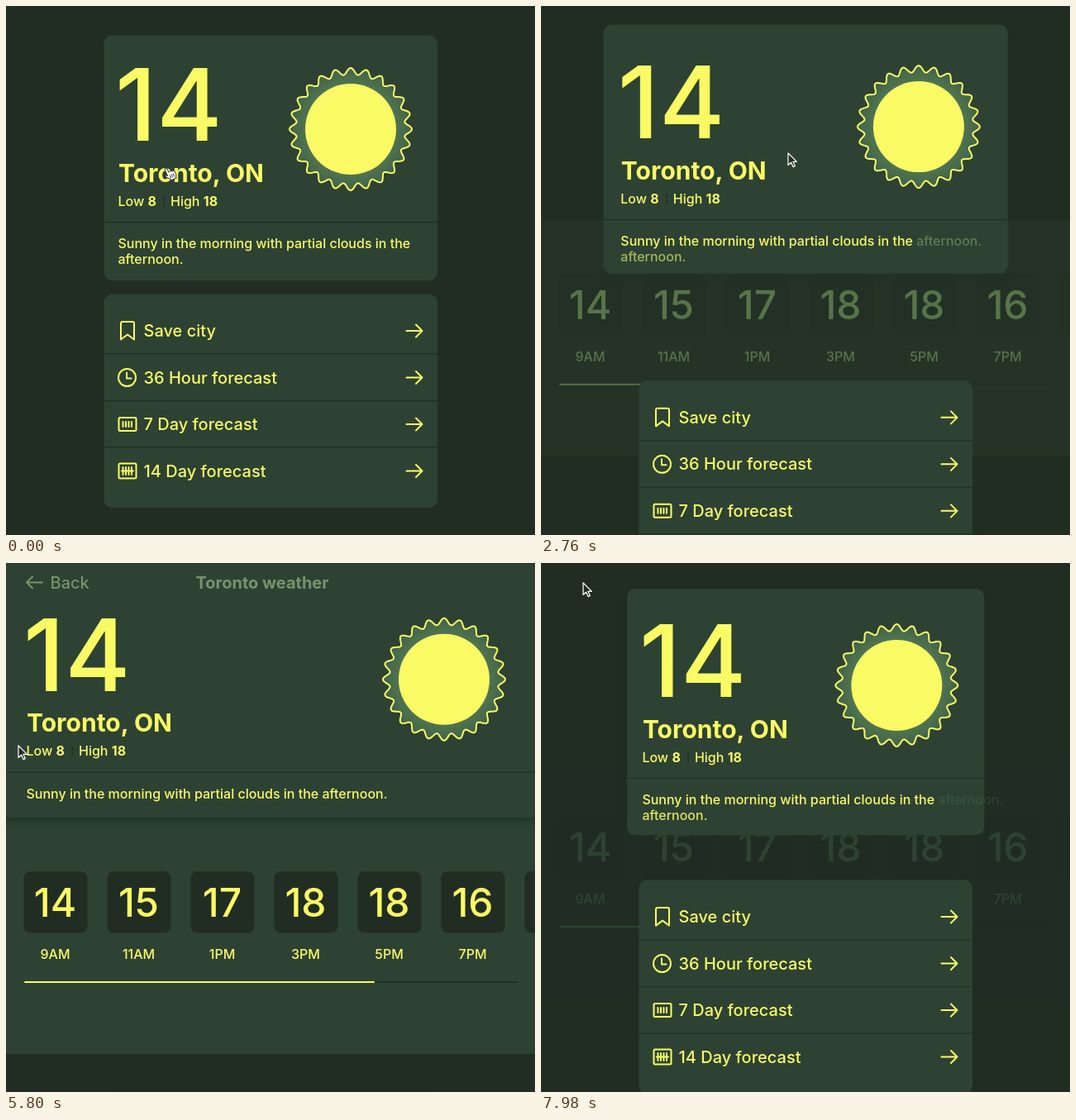
An HTML page that plays this animation: 640 px wide and 640 px high, repeating every 8000 ms.

```html
<!DOCTYPE html>
<html lang="en">
<head>
<meta charset="utf-8">
<title>Weather card</title>
<style>
  :root { --bg: #212d23; --panel: #2d4233; --ink: #fafb64; --line: #213024; }
  html, body { margin: 0; height: 100%; overflow: hidden; background: var(--bg); }
  svg { display: block; width: 100vw; height: 100vh; }
  text { font: 500 16px Inter, sans-serif; fill: var(--ink); white-space: pre; }
  .big { font-size: 121px; }
  .city { font-size: 30px; font-weight: 700; }
  .row text, #header text { font-size: 20px; }
  .bold, #header .bold { font-weight: 700; }
  .temp { font-size: 48px; }
  #hours text { text-anchor: middle; fill: inherit; }
  .icon { fill: none; stroke: var(--ink); stroke-width: 2; stroke-linejoin: round; stroke-linecap: round; }
  .rule { stroke: var(--line); stroke-width: 1.4; }
  #header text { fill: #78936b; }
  #header .icon { stroke: #78936b; }
</style>
</head>
<body>
<svg viewBox="0 0 640 640">
  <defs>
    <filter id="soft" x="-10%" y="-10%" width="120%" height="120%"><feGaussianBlur stdDeviation="3"/></filter>
    <radialGradient id="glow" gradientUnits="userSpaceOnUse" cx="0" cy="0" r="74">
      <stop offset=".74" stop-color="#50744f"/><stop offset="1" stop-color="#40634a"/>
    </radialGradient>
  </defs>
  <rect width="640" height="640" fill="#212d23"/>

  <g id="panel">
    <rect id="panelBack" y="309" width="640" height="285" fill="#2d4233"/>
    <g id="hours"></g>
  </g>

  <g id="list">
    <rect id="listShadow" x="119" y="348" width="403" height="258" rx="10" fill="#263a29" filter="url(#soft)"/>
    <rect x="118.5" y="348.5" width="403.5" height="258.5" rx="10" fill="#2d4233"/>
  </g>

  <rect id="cardShadow" rx="10" fill="#243826" filter="url(#soft)"/>
  <rect id="card" rx="10" fill="#2d4233"/>
  <line id="cardRule" class="rule"/>
  <g id="info">
    <text class="big" id="degrees" y="163">14</text>
    <text class="city" x="136" y="212.5">Toronto, ON</text>
    <text x="135.5" y="241.7">Low <tspan class="bold">8</tspan></text>
    <line class="rule" x1="191" x2="191" y1="230" y2="243"/>
    <text x="199" y="241.7">High <tspan class="bold">18</tspan></text>
    <text x="135.5" y="293">Sunny in the morning with partial clouds in the <tspan id="inlineWord">afternoon.</tspan></text>
    <text id="wrappedWord" x="135.5" y="312.3">afternoon.</text>
  </g>
  <g id="sun">
    <path id="rays" fill="url(#glow)" stroke="#fafb64" stroke-width="2" stroke-linejoin="round"/>
    <circle r="55" fill="#f9fa64"/>
  </g>

  <g id="header">
    <path class="icon" d="M44 23.5H25m7-7-7 7 7 7"/>
    <text x="53.5" y="30.5">Back</text>
    <text class="bold" x="229.5" y="30.5">Toronto weather</text>
  </g>

  <g id="cursor">
    <path id="arrow" d="M0 0V14.5L3.6 11.2 6 16.6 8.3 15.6 6 10.4H10.4Z" fill="#212d23" stroke="#fff" stroke-width="1.2" stroke-linejoin="round"/>
    <g id="hand" transform="translate(-3 3.5) rotate(-25)">
      <path d="M-1.5 1.5a1.5 1.5 0 0 1 3 0V5.5q1.3-1 2.6.4 1.5-.8 2.5.5 2-.6 2 1.6V11q0 2-1.5 3.5V16H0V14.5L-4 9.5q-.8-1.8.9-1.8l1.6 1.3Z" fill="#fff" stroke="#212d23" stroke-width=".9"/>
      <path d="M1.2 9.5v4M3.4 9.5v4M5.6 9.5v4" stroke="#212d23" stroke-width=".9"/>
    </g>
  </g>
</svg>
<script>
const LOOP = 8000, OPEN = 2518, CLOSE = 7515, MOVE = 600, OVER_BACK = 6380;
const $ = id => document.getElementById(id);
const lerp = (a, b, k) => a + (b - a) * k;
const clamp = k => Math.max(0, Math.min(1, k));
const ease = k => .5 - .5 * Math.cos(Math.PI * clamp(k));
const set = (id, attrs) => {
  for (const name in attrs) $(id).setAttribute(name, attrs[name]);
};
const shift = (id, x, y) => set(id, { transform: `translate(${x} ${y})` });

function buildList() {
  const bars = (top, bottom) => [141.5, 145, 148.5, 152].map(x => `M${x} ${top}V${bottom}`).join('');
  const rows = [
    ['Save city', 'M139 403.5V384q0-2 2-2h12q2 0 2 2v19.5l-8-6z'],
    ['36 Hour forecast', 'M136 393a10.5 10.5 0 1 0 21 0a10.5 10.5 0 1 0-21 0M146 387v7h5.5'],
    ['7 Day forecast', 'M138 385h18q1.5 0 1.5 1.5v13q0 1.5-1.5 1.5h-18q-1.5 0-1.5-1.5v-13q0-1.5 1.5-1.5' + bars(390, 396)],
    ['14 Day forecast', 'M138 384h18q1.5 0 1.5 1.5v15q0 1.5-1.5 1.5h-18q-1.5 0-1.5-1.5v-15q0-1.5 1.5-1.5M140 393h14' + bars(388.5, 397.5)]
  ];
  $('list').innerHTML += rows.map(([label, icon], i) => `
    <g class="row" transform="translate(0 ${i * 56.5})">
      <path class="icon" d="${icon}"/>
      <text x="166.5" y="400">${label}</text>
      <path class="icon" d="M484.5 393h19m-7.5-7.5 7.5 7.5-7.5 7.5"/>
      ${i < 3 ? '<line class="rule" x1="118.5" x2="522" y1="421" y2="421"/>' : ''}
    </g>`).join('');
}

function buildHours() {
  const temps = [14, 15, 17, 18, 18, 16, 15];
  const times = ['9AM', '11AM', '1PM', '3PM', '5PM', '7PM', '9PM'];
  $('hours').innerHTML = temps.map((temp, i) => `
    <g transform="translate(${21.5 + i * 101} 0)">
      <rect y="373" width="77" height="74.5" rx="8" fill="#212d23"/>
      <text class="temp" x="38" y="428">${temp}</text>
      <text x="38" y="479">${times[i]}</text>
    </g>`).join('') +
    '<rect x="22" y="506" width="597" height="2" rx="1" fill="#213024"/>' +
    '<rect x="22" y="506" width="424" height="2" rx="1"/>';
}

function buildSun() {
  let d = '';
  for (let i = 0; i < 480; i++) {
    const a = i / 480 * 2 * Math.PI, r = 70 + 4 * Math.cos(24 * a);
    d += `${i ? 'L' : 'M'}${(r * Math.cos(a)).toFixed(2)} ${(r * Math.sin(a)).toFixed(2)}`;
  }
  set('rays', { d: d + 'Z' });
}

// Align the visible left edge of the large digits with the text below.
function alignDegrees() {
  const ctx = document.createElement('canvas').getContext('2d');
  ctx.font = '500 121px Inter, sans-serif';
  set('degrees', { x: 137 + ctx.measureText('14').actualBoundingBoxLeft });
}

// Time, x, y of the pointer's hot spot.
const route = [
  [0, 196, 193], [400, 196, 193], [1700, 299, 178], [4700, 299, 178],
  [5600, 14, 221], [5800, 15, 221], [6600, 80, 17], [7150, 80, 17],
  [7480, 51, 24], [LOOP, 51, 24]
];

function pointerAt(t) {
  const i = route.findIndex((step, n) => n && t <= step[0]);
  const [t0, x0, y0] = route[i - 1], [t1, x1, y1] = route[i];
  const k = ease((t - t0) / (t1 - t0));
  return [lerp(x0, x1, k), lerp(y0, y1, k)];
}

function render(t) {
  const p = ease((t - OPEN) / MOVE) - ease((t - CLOSE) / MOVE);
  const x = lerp(118.5, -3, p), right = lerp(522, 643, p);
  const y = lerp(35.5, -1, p), bottom = lerp(332, 308, p);
  const tint = `color-mix(in srgb, #fafb64 ${clamp(p * 1.3) * 100}%, #7ddca7)`;
  const wrapTint = `color-mix(in srgb, #fafb64 ${clamp((1 - p) * 1.3) * 100}%, #7ddca7)`;

  set('card', { x, y, width: right - x, height: bottom - y });
  set('cardShadow', { x: x - 2, y: y + 6, width: right - x + 4, height: bottom - y, opacity: p });
  const ruleY = 261.5 - 8.4 * p;
  set('cardRule', { x1: x, x2: right, y1: ruleY, y2: ruleY });
  shift('info', -111 * p, -8.3 * p);
  shift('sun', 417 + 113 * p, 149 - 8.2 * p);
  set('inlineWord', { 'fill-opacity': p, style: `fill:${tint}` });
  set('wrappedWord', { 'fill-opacity': 1 - p, style: `fill:${wrapTint}` });

  shift('panel', 0, -76 * (1 - p));
  set('panelBack', { opacity: p * p * (3 - 2 * p) });
  set('hours', { opacity: p, style: `fill:${tint}` });
  shift('list', 0, 297 * p);
  set('listShadow', { opacity: p * .7 });
  shift('header', 0, -115 * (1 - p));
  set('header', { opacity: p });

  const isHand = t < OPEN || (t > OVER_BACK && t < CLOSE);
  shift('cursor', ...pointerAt(t));
  set('hand', { visibility: isHand ? 'visible' : 'hidden' });
  set('arrow', { visibility: isHand ? 'hidden' : 'visible' });
}

buildList();
buildHours();
buildSun();
alignDegrees();
function tick() {
  render(performance.now() % LOOP);
  requestAnimationFrame(tick);
}
tick();
</script>
</body>
</html>
```
